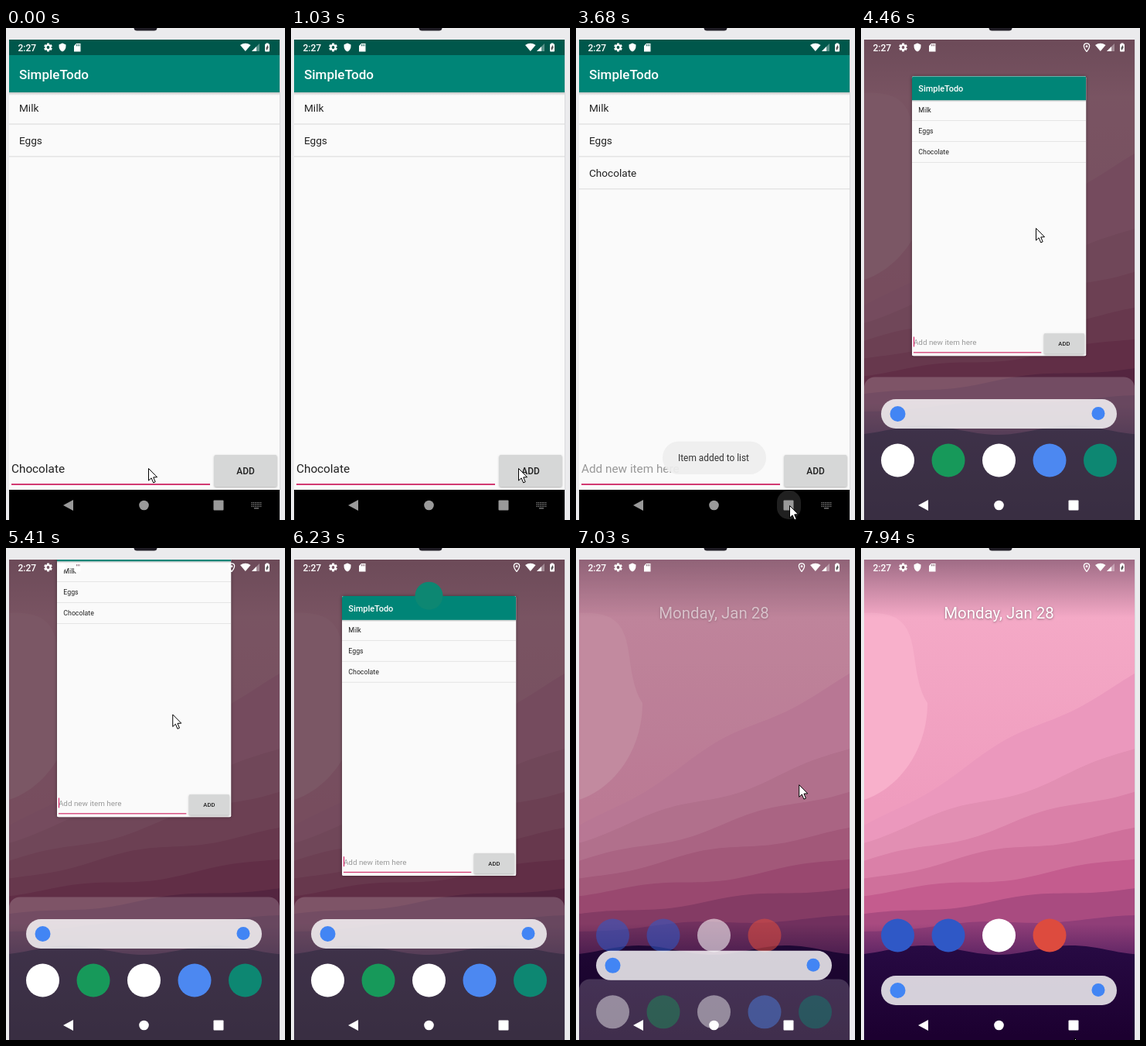
An HTML page with a canvas that plays this animation: 361 px wide and 635 px high, repeating every 8000 ms.

```html
<!DOCTYPE html>
<html lang="en">
<head>
<meta charset="utf-8">
<title>Todo list demo</title>
<style>
html, body { margin: 0; width: 100%; height: 100%; overflow: hidden; background: #ebebed; }
canvas { display: block; width: 361px; height: 635px; }
</style>
</head>
<body>
<canvas id="stage"></canvas>
<script>
const W = 361, H = 635, LOOP = 8000;
const SCREEN = { x: 4, y: 15, w: 350, h: 620 };
const CARD = { x: 66, y: 62.3, scale: .6435 };
const TEAL = '#008577', DARK_TEAL = '#00574b', INK = '#212121', WHITE = '#fff';
const canvas = document.getElementById('stage');
const c = canvas.getContext('2d');
const dpr = window.devicePixelRatio || 1;
canvas.width = W * dpr;
canvas.height = H * dpr;

// Moments of the story, in ms.
const ADD = 1930, RECENTS = 3960, SHOW_ICON = 4590, FLICK = 6230, HOME = 6910;

// Pointer trips: when each starts and ends, and where it leads.
const TRIPS = [
  { from: 130, to: 1030, x: 294, y: 568 },
  { from: 2070, to: 2220, x: 219, y: 575 },
  { from: 2620, to: 3010, x: 276, y: 616 },
  { from: RECENTS, to: 4460, x: 226, y: 258 },
  { from: SHOW_ICON, to: 4740, x: 256, y: 300 },
  { from: 5100, to: 5980, x: 186, y: 153 },
  { from: 6350, to: HOME, x: 239, y: 171 },
  { from: HOME, to: 7270, x: 327, y: 411 },
  { from: 7270, to: 7940, x: 276, y: 632 },
];

const clamp = v => Math.max(0, Math.min(1, v));
const mix = (a, b, p) => a + (b - a) * p;
const ramp = (t, a, b) => clamp((t - a) / (b - a));
const easeOut = p => p * (2 - p);

function rect(x, y, w, h, fill) {
  c.fillStyle = fill;
  c.fillRect(x, y, w, h);
}

function round(x, y, w, h, r, fill) {
  c.beginPath();
  c.roundRect(x, y, w, h, r);
  c.fillStyle = fill;
  c.fill();
}

function disc(x, y, r, fill) {
  c.beginPath();
  c.arc(x, y, r, 0, Math.PI * 2);
  c.fillStyle = fill;
  c.fill();
}

function poly(points, fill) {
  c.beginPath();
  points.forEach(([x, y]) => c.lineTo(x, y));
  c.closePath();
  c.fillStyle = fill;
  c.fill();
}

function text(s, x, y, size, fill, weight = 400, align = 'left') {
  c.font = `${weight} ${size}px Roboto, sans-serif`;
  c.textAlign = align;
  c.fillStyle = fill;
  c.fillText(s, x, y);
}

function fade(y0, y1, from, to) {
  const g = c.createLinearGradient(0, y0, 0, y1);
  g.addColorStop(0, from);
  g.addColorStop(1, to);
  return g;
}

function group(alpha, draw) {
  if (alpha <= 0) return;
  c.save();
  c.globalAlpha *= alpha;
  draw();
  c.restore();
}

function shadowed(blur, drop, alpha, draw) {
  c.save();
  c.shadowColor = `rgba(0,0,0,${alpha})`;
  c.shadowBlur = blur * dpr;
  c.shadowOffsetY = drop * dpr;
  draw();
  c.restore();
}

// Fills everything below height(u), where u runs from 0 to 1 across the screen.
function ridge(height, fill) {
  c.beginPath();
  c.moveTo(4, H);
  for (let u = 0; u <= 1.001; u += .02) c.lineTo(4 + 350 * u, height(u));
  c.lineTo(354, H);
  c.fillStyle = fill;
  c.fill();
}

function wallpaper() {
  rect(4, 15, 350, 620, fade(90, 330, '#f4a9c6', '#ef9cbe'));
  c.beginPath();
  c.moveTo(4, 84);
  c.bezierCurveTo(90, 78, 55, 150, 86, 200);
  c.bezierCurveTo(86, 260, 50, 310, 4, 325);
  c.fillStyle = '#f8b0cb';
  c.fill();

  const hills = ['#eb98bd', '#e28fb3', '#da80a8', '#cf709b', '#c45c8e', '#a94b80', '#903e78'];
  hills.forEach((fill, i) => {
    const p = i / (hills.length - 1);
    const left = 358 + 137 * p, right = 162 + 312 * p ** .65;
    const wave = 8 * (1 - p / 2);
    ridge(u => mix(left, right, u) + wave * Math.sin(u * 9 + i * 2.3) * Math.sin(u * Math.PI), fill);
  });
  rect(4, 485, 350, 50, fade(485, 530, 'rgba(70,25,90,0)', 'rgba(70,25,90,.7)'));
  ridge(u => 519 + 6 * Math.cos(u * 11.5 + .6), fade(515, 630, '#270a43', '#1c0030'));
}

function statusIcons(pin) {
  const hole = pin ? '#7a5a68' : DARK_TEAL;
  text('2:27', 15.5, 29.5, 12, WHITE, 500);
  for (let i = 0; i < 3; i++) {
    c.save();
    c.translate(54.5, 25);
    c.rotate(i * Math.PI / 3);
    rect(-1.5, -5.4, 3, 10.8, WHITE);
    c.restore();
  }
  disc(54.5, 25, 4, WHITE);
  disc(54.5, 25, 1.9, hole);

  c.beginPath();
  c.moveTo(73, 19.5);
  c.lineTo(77.5, 21.4);
  c.quadraticCurveTo(78, 28.5, 73, 30.5);
  c.quadraticCurveTo(68, 28.5, 68.5, 21.4);
  c.fillStyle = WHITE;
  c.fill();

  poly([[91, 20], [96.5, 20], [96.5, 30.5], [88, 30.5], [88, 23]], WHITE);
  for (let i = 0; i < 3; i++) rect(91 + i * 1.8, 21, .8, 2.4, hole);

  c.beginPath();
  c.moveTo(309.8, 30);
  c.lineTo(303, 22);
  c.quadraticCurveTo(309.8, 17.5, 316.6, 22);
  c.fillStyle = WHITE;
  c.fill();
  poly([[318, 30], [328, 20], [328, 30]], 'rgba(255,255,255,.35)');
  poly([[318, 30], [324, 24], [324, 30]], WHITE);

  rect(336.5, 19.5, 3, 1.5, WHITE);
  round(335, 20.5, 6, 10, 1, WHITE);
  poly([[338.6, 22], [336.3, 26], [337.4, 29], [339.7, 25]], '#555');

  if (pin) {
    c.beginPath();
    c.moveTo(292, 30.5);
    c.bezierCurveTo(286, 23, 288.5, 19.8, 292, 19.8);
    c.bezierCurveTo(295.5, 19.8, 298, 23, 292, 30.5);
    c.strokeStyle = WHITE;
    c.lineWidth = 1.3;
    c.stroke();
    disc(292, 23.7, 1.4, WHITE);
  }
}

function navIcons(fill) {
  poly([[74, 616], [87, 609], [87, 623]], fill);
  disc(178.5, 616, 6.3, fill);
  round(268.5, 609.5, 13, 13, 1, fill);
}

function keyboardIcon() {
  for (let row = 0; row < 3; row++)
    for (let i = 0; i < 6; i++) rect(317.5 + i * 2.3, 612 + row * 2.4, 1.3, 1.3, '#8c8c8c');
  rect(321, 619.3, 6, 1.2, '#8c8c8c');
}

// Blinks every 500 ms; the snapshot in the overview keeps it on.
function caretOn(t) {
  if (t >= RECENTS) return true;
  const since = t - (t < ADD ? 430 : ADD);
  return since >= 0 && Math.floor(since / 500) % 2 === 0;
}

function app(t) {
  const added = t >= ADD;
  rect(4, 35, 350, 561, '#fafafa');
  rect(4, 83, 350, 4, fade(83, 87, 'rgba(0,0,0,.22)', 'rgba(0,0,0,0)'));
  rect(4, 35, 350, 48, TEAL);
  text('SimpleTodo', 17, 65.5, 17, WHITE, 500);

  const items = ['Milk', 'Eggs'];
  if (added) items.push('Chocolate');
  items.forEach((item, i) => {
    text(item, 17, 108.3 + i * 41.9, 13.6, INK);
    rect(4, 123.5 + i * 41.9, 350, 1, '#dadada');
  });

  if (added) text('Add new item here', 7, 573.5, 15.3, '#989898');
  else text('Chocolate', 7, 573.5, 15.3, INK);
  rect(7, 588, 257, 2, '#d23a72');
  if (caretOn(t)) rect(added ? 7 : 76, 557.5, 1.7, 20, '#d81b60');

  const pressed = added && t < ADD + 270;
  shadowed(2.5, 1, .3, () => round(269.5, 551, 81, 41, 2, pressed ? '#bfc0c0' : '#d6d7d7'));
  text('ADD', 310, 575.5, 11.9, INK, 500, 'center');
}

function toast(t) {
  const alpha = ramp(t, 2070, 2620) * (1 - ramp(t, RECENTS, 4150));
  group(alpha, () => {
    round(112, 533.5, 134, 42.5, 21, 'rgba(238,238,238,.92)');
    text('Item added to list', 132, 559.3, 11.9, '#333');
  });
}

function searchBar(y) {
  round(26, y, 305, 38, 19, 'rgba(255,255,255,.81)');
  disc(47.5, y + 19, 10, '#4285f4');
  disc(307, y + 18.5, 8.5, '#4285f4');
}

function iconRow(y, colors) {
  colors.forEach((fill, i) => disc(47.5 + i * 65.5, y, 21.5, fill));
}

// amount: 0 is the home screen, 1 is the overview with its raised shelf
function launcher(amount, fromApp) {
  wallpaper();
  rect(4, 15, 350, 75, fade(15, 90, `rgba(30,15,35,${mix(.4, .12, amount)})`, 'rgba(30,15,35,0)'));
  rect(4, 15, 350, 620, `rgba(0,0,0,${.5 * amount})`);
  const top = mix(640, 450.5, amount);
  round(4, top, 350, 250, [14, 14, 0, 0], 'rgba(255,255,255,.18)');
  if (!fromApp) {
    group(1 - amount, () => {
      shadowed(3, 1, .4, () => text('Monday, Jan 28', 178.5, 91.3, 20.4, WHITE, 400, 'center'));
      iconRow(500, ['#2f58c6', '#2f58c6', WHITE, '#dd4b3e']);
    });
  }
  searchBar(fromApp ? top + 28.5 : mix(552, 479, amount));
  group(amount, () => iconRow(mix(631, 558, amount),
    [WHITE, '#17995a', WHITE, '#4c88f1', '#0d8772']));
}

// The card is pulled up and let go once, then flicked off the top.
function cardLift(t) {
  const tug = Math.sin(Math.PI * ramp(t, 5100, 5720)) ** 2;
  return -76 * tug - 430 * ramp(t, FLICK, 6760) ** 1.15;
}

function appWindow(t, p, lift) {
  const scale = mix(1, CARD.scale, p);
  const x = mix(4, CARD.x, p), y = mix(35, CARD.y, p) + lift;
  const box = [x, y, 350 * scale, 561 * scale, 2 * p];
  shadowed(4, 0, .4, () => round(...box, '#fafafa'));
  c.save();
  c.beginPath();
  c.roundRect(...box);
  c.clip();
  c.translate(x, y);
  c.scale(scale, scale);
  c.translate(-4, -35);
  app(t);
  c.restore();
}

function pointer(t) {
  if (t >= FLICK && t < 6350) return;
  let x = 184, y = 568;
  for (const trip of TRIPS) {
    const p = easeOut(ramp(t, trip.from, trip.to));
    x = mix(x, trip.x, p);
    y = mix(y, trip.y, p);
  }
  c.save();
  c.translate(x + .5, y + .5);
  poly([[0, 0], [0, 15.6], [3.6, 12.3], [6.2, 18.4], [8.7, 17.3], [6.2, 11.4], [11, 11.2]], WHITE);
  c.strokeStyle = '#000';
  c.lineWidth = 1;
  c.stroke();
  c.restore();
}

function systemBars() {
  rect(4, 15, 350, 20, DARK_TEAL);
  rect(4, 596, 350, 39, '#000');
}

function foreground(t) {
  systemBars();
  app(t);
  if (t >= 3530) round(260, 597, 31, 37, 15, '#202020');
  navIcons('#9a9a9a');
  keyboardIcon();
  statusIcons(false);
}

function overview(t) {
  const p = easeOut(ramp(t, RECENTS, 4440));
  const leaving = t >= HOME;
  launcher(leaving ? 1 - easeOut(ramp(t, HOME, 7270)) : p, !leaving);
  if (t < 6760) {
    const lift = cardLift(t);
    appWindow(t, p, lift);
    group(ramp(t, SHOW_ICON, 4740), () => disc(178.5, 62 + lift, 18, '#0d8772'));
  }
  group(1 - p, systemBars);
  navIcons(WHITE);
  statusIcons(true);
}

function draw(t) {
  c.setTransform(dpr, 0, 0, dpr, 0, 0);
  rect(0, 0, W, H, '#ebebed');
  round(165.5, -6, 30, 9.5, 4, '#1f1c24');
  rect(354, 15, 1, 620, '#d9d9dc');
  c.save();
  c.beginPath();
  c.rect(SCREEN.x, SCREEN.y, SCREEN.w, SCREEN.h);
  c.clip();
  if (t < RECENTS) foreground(t);
  else overview(t);
  toast(t);
  pointer(t);
  c.restore();
}

const start = performance.now();

function frame() {
  draw((performance.now() - start) % LOOP);
  requestAnimationFrame(frame);
}

frame();
</script>
</body>
</html>
```
